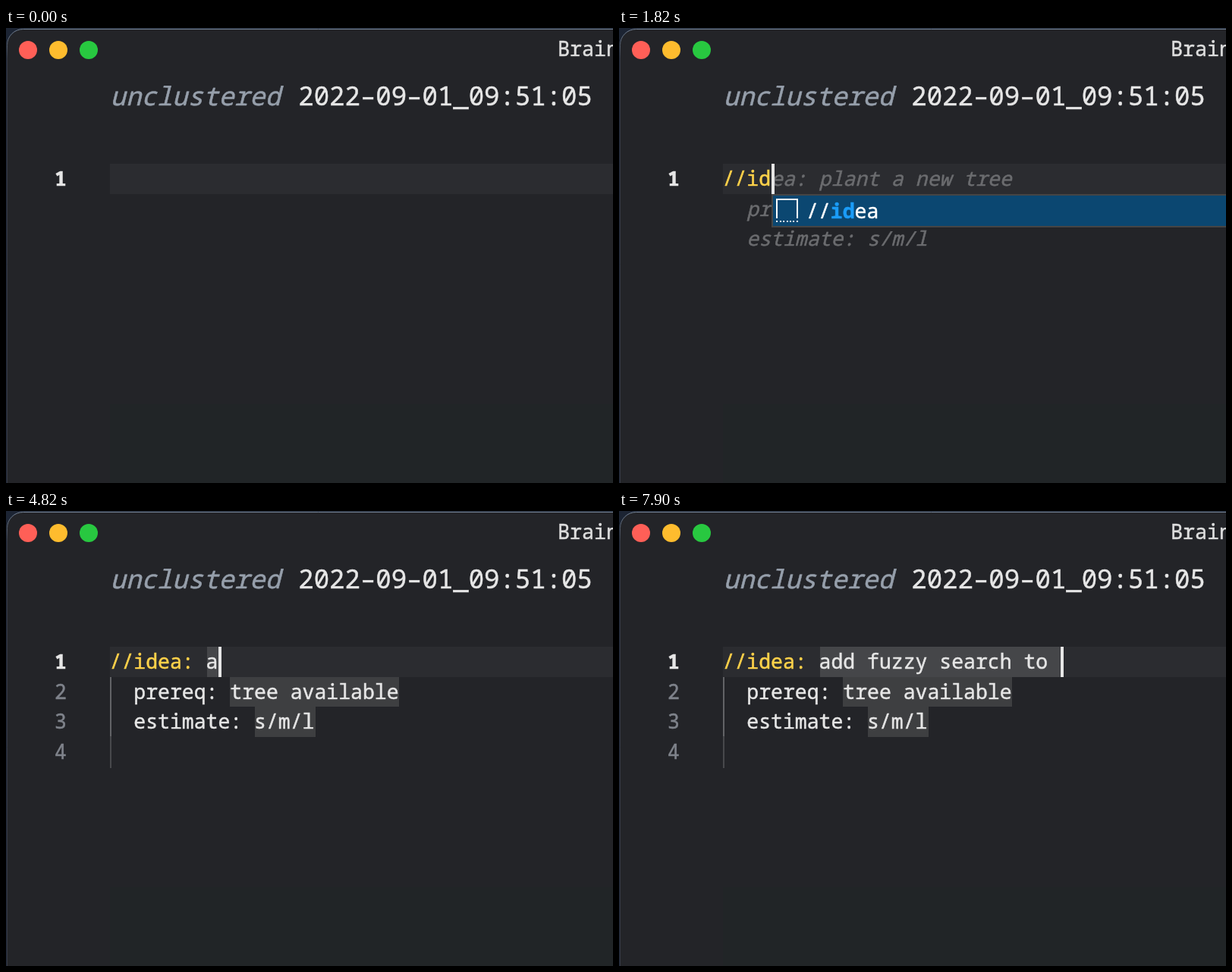
Write an HTML page with a canvas that moves like this. It is 800x600 px and loops after 8 s.

```html
<!DOCTYPE html>
<html lang="en">
<head>
<meta charset="utf-8">
<title>Snippet editor</title>
<style>
html, body { margin: 0; width: 100%; height: 100%; overflow: hidden; background: #232428; }
canvas { display: block; }
</style>
</head>
<body>
<canvas id="stage" width="800" height="600"></canvas>
<script>
const ctx = document.getElementById("stage").getContext("2d");
const LOOP = 8000, LEFT = 137, TOP = 179, CHAR = 15.875, ROW = 39.65;
const WHITE = "#e6e6e6", YELLOW = "#ffd24a", GHOST = "#6b6c6f";

const IDEA = "add fuzzy search to ";
const KEY_TIMES = [4820, 5070, 5150, 5310, 5640, 5970, 6220, 6300, 6460, 6620,
  6780, 6940, 7100, 7180, 7340, 7500, 7580, 7740, 7820, 7900];
const BLINKS_OFF = [[0, 250], [1080, 1580], [2820, 3320], [3820, 4320]];
const MENU = ["calendar week", "date", "date+time", "Hello Snippet", "idea", "time", "today", "trigger"];
const KEYWORDS = ["calendar week", "date", "date+time", "time"];

const column = n => LEFT + n * CHAR;
const rowTop = n => TOP + n * ROW;

function rect(x, y, w, h, color) {
  ctx.fillStyle = color;
  ctx.fillRect(x, y, w, h);
}

// Lays text on a fixed character grid; a thin stroke gives a medium weight.
function text(str, x, baseline, color, style = "", advance = CHAR) {
  ctx.font = `${style} ${advance / 0.6}px "Noto Sans Mono", monospace`;
  ctx.fillStyle = ctx.strokeStyle = color;
  ctx.lineWidth = 0.5;
  [...str].forEach((ch, i) => {
    ctx.fillText(ch, x + i * advance, baseline);
    ctx.strokeText(ch, x + i * advance, baseline);
  });
}

function codeText(str, col, row, color, style) {
  text(str, column(col) - 0.5, rowTop(row) + 29, color, style);
}

function drawWindow() {
  rect(0, 0, 800, 600, "#1c2433");
  ctx.beginPath();
  ctx.roundRect(1.5, 1.5, 900, 700, 21);
  ctx.fillStyle = "#232428";
  ctx.fill();
  const edge = ctx.createLinearGradient(0, 0, 0, 40);
  edge.addColorStop(0, "#78879a");
  edge.addColorStop(1, "#363a44");
  ctx.strokeStyle = edge;
  ctx.lineWidth = 1;
  ctx.stroke();
  rect(LEFT, 496, 663, 104, "#212527");
  ["#ff5f57", "#febc2e", "#28c840"].forEach((color, i) => {
    ctx.beginPath();
    ctx.arc(29 + i * 40, 29, 12, 0, 7);
    ctx.fillStyle = color;
    ctx.fill();
  });
  text("Brain", 727, 37, "#dedede", "", 16);
  text("unclustered", 137.5, 102, "#969fab", "italic", 20.4);
  text("2022–09–01_09:51:05", 385.3, 102, WHITE, "", 20.4);
  text("1", 64, 208, WHITE, "600");
}

function drawIcon(keyword, x, y, color) {
  const u = 2.2;
  const bar = (bx, by, w, h = 1) =>
    rect(x + Math.round(bx * u), Math.round(y + by * u), Math.round(w * u), Math.round(h * u), color);
  if (keyword) {
    bar(1, 2, 7); bar(1, 4, 7); bar(1, 2, 1, 3); bar(7, 2, 1, 3);
    bar(10, 3, 5); bar(1, 7, 9); bar(12, 7, 2);
    bar(1, 10, 6); bar(10, 10, 5); bar(1, 13, 11);
  } else {
    bar(2, 1, 13); bar(2, 1, 1, 12); bar(14, 1, 1, 12);
    for (let i = 2; i < 15; i += 2) bar(i, 14, 1);
  }
}

function drawMenu(col, items, match) {
  const x = Math.round(column(col)), height = Math.ceil(items.length * ROW + 3.5);
  rect(x, 219, 800 - x, height, "#454545");
  rect(x + 2, 221, 800 - x, height - 4, "#252526");
  rect(x + 2, 221, 800 - x, 40, "#0b4771");
  items.forEach((item, i) => {
    const center = 241 + i * ROW, baseline = center + 9.5, color = i ? "#d2d2d2" : "#ffffff";
    drawIcon(KEYWORDS.includes(item), x + 2, center - 18, color);
    text("//", x + 46, baseline, color);
    text(match, x + 46 + 2 * CHAR, baseline, "#1b9cf7", "bold");
    text(item.slice(match.length), x + 46 + (2 + match.length) * CHAR, baseline, color);
  });
}

function drawTyping(t) {
  const count = [500, 580, 1740, 1820].filter(k => t >= k).length;
  const typed = "//id".slice(0, count);
  rect(LEFT, TOP, 663, 40, "#2b2c30");
  codeText(typed, 0, 0, count > 2 ? YELLOW : WHITE);
  if (count === 2) {
    codeText("cw37", 2, 0, GHOST, "italic");
    drawMenu(2, MENU, "");
  } else if (count > 2) {
    codeText("//idea: plant a new tree".slice(count), count, 0, GHOST, "italic");
    codeText("prereq: tree available", 2, 1, GHOST, "italic");
    codeText("estimate: s/m/l", 2, 2, GHOST, "italic");
    drawMenu(count, ["idea"], typed.slice(2));
  }
  return count;
}

function drawSnippet(t) {
  const count = KEY_TIMES.filter(k => t >= k).length;
  const idea = count ? IDEA.slice(0, count) : "plant a new tree";
  const width = idea.length * CHAR;
  if (count) {
    rect(LEFT, TOP, 663, 40, "#2b2c30");
    rect(265, TOP, width - 1, 40, "#454649");
  } else {
    ctx.fillStyle = "#51575f";
    ctx.beginPath();
    ctx.roundRect(265, TOP, width + 1, 40, [5, 0, 0, 5]);
    ctx.fill();
    [5, 7, 11].forEach(i => codeText("·", 8 + i, 0, "#7c8187"));
  }
  rect(295, 219, 223, 39, "#3e3f41");
  rect(328, 258, 80, 40, "#3e3f41");
  rect(LEFT, 219, 2, 78, "#626366");
  rect(LEFT, 297, 2, 42, "#48494c");
  codeText("//idea:", 0, 0, YELLOW);
  codeText(idea, 8, 0, WHITE);
  codeText("prereq: tree available", 2, 1, WHITE);
  codeText("estimate: s/m/l", 2, 2, WHITE);
  for (let n = 2; n < 5; n++) text(String(n), 64, rowTop(n - 1) + 29, "#7f838b");
  return 8 + idea.length;
}

function draw(now) {
  const t = now % LOOP;
  drawWindow();
  const caret = t < 2320 ? drawTyping(t) : drawSnippet(t);
  if (!BLINKS_OFF.some(([from, to]) => t >= from && t < to)) {
    rect(Math.round(column(caret) + 0.3), TOP, 4, 40, WHITE);
  }
  requestAnimationFrame(draw);
}
requestAnimationFrame(draw);
</script>
</body>
</html>
```
